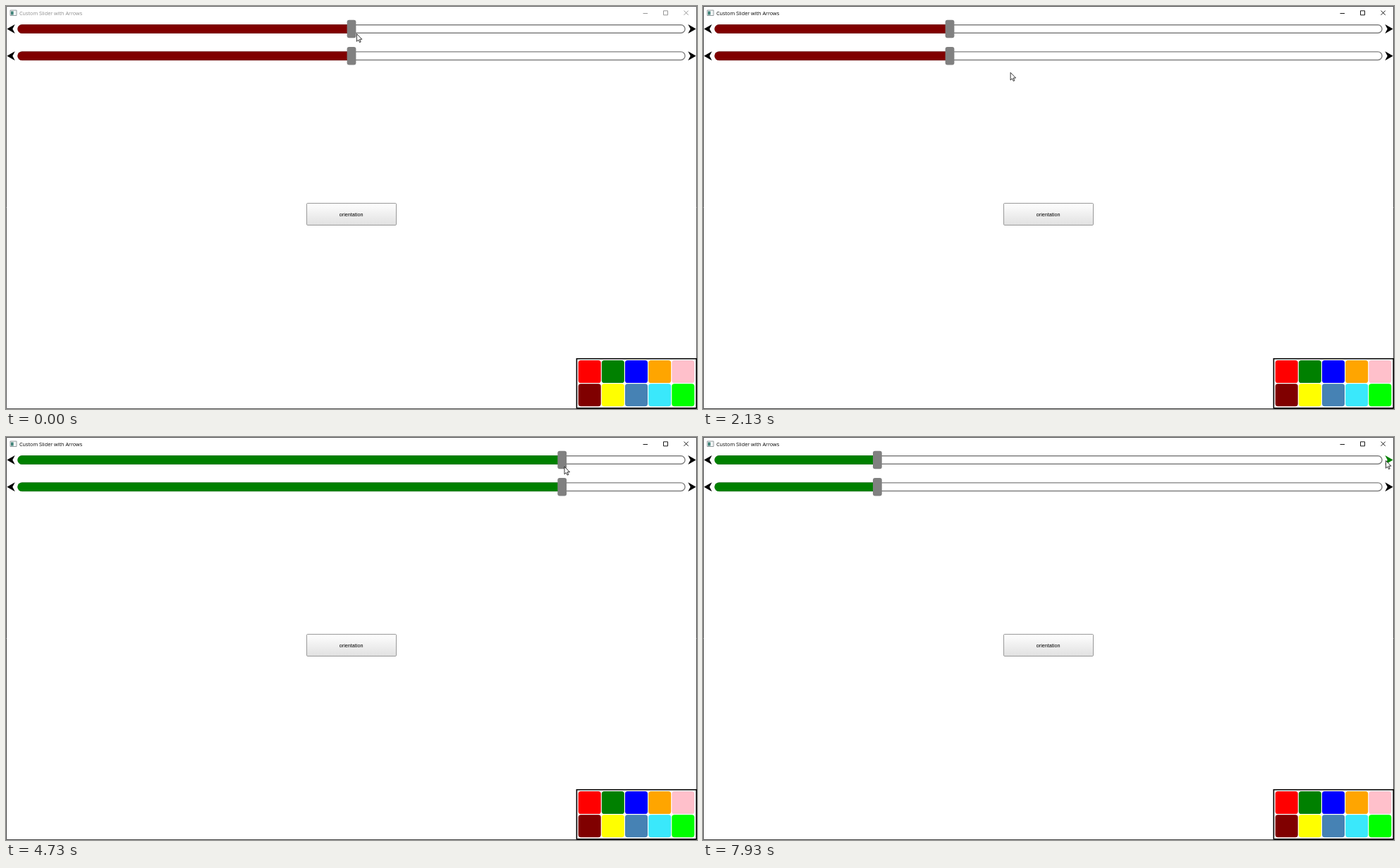
An HTML page with a canvas that plays this animation: 980x571 px, repeating every 8000 ms.

```html
<!DOCTYPE html>
<html lang="en">
<head>
<meta charset="utf-8">
<title>Slider</title>
<style>
html, body { margin: 0; width: 100%; height: 100%; overflow: hidden; background: #fff; }
canvas { display: block; width: 980px; height: 571px; }
</style>
</head>
<body>
<canvas id="stage" width="980" height="571"></canvas>
<script>
const ctx = document.getElementById('stage').getContext('2d');
const LOOP = 8000, TICK = 1000 / 15;
const PERCENT = 28 / 3;  // slider pixels per step

const smooth = k => k * k * (3 - 2 * k);
const linear = k => k;
const slowing = p => k => 1 - (1 - k) ** p;

// Pointer gestures in ticks; bend bows the path sideways.
const home = [497, 39];
const moves = [
  { from: 3, to: 13, end: [865, 9], ease: smooth },
  { from: 15, to: 18, end: [406, 60], ease: linear },
  { from: 18, to: 27, end: [160, 94], ease: slowing(2.3) },
  { from: 29, to: 37, end: [788, 62], ease: slowing(1.23), bend: [0, 15] },
  { from: 39, to: 52, end: [868, 484], ease: smooth, bend: [143, 0] },
  { from: 52, to: 58, end: [853, 519], ease: smooth },
  { from: 61, to: 65, end: [836, 101], ease: smooth, bend: [20, 0] },
  { from: 65, to: 72, end: [789, 38], ease: smooth },
  { from: 75, to: 78, end: [265, 130], ease: linear },
  { from: 78, to: 82, end: [160, 142], ease: slowing(1.5) },
  { from: 82, to: 84, end: [199, 138], ease: linear },
  { from: 88, to: 91, end: [982, 48], ease: slowing(0.73), bend: [0, -15] },
  { from: 95, to: 101, end: [968, 33], ease: slowing(2) }
];
const drags = [{ from: 3, to: 38 }, { from: 75, to: 85 }];
const recolorTick = 62, hoverTick = 98;
const arrowClicks = [106, 111, 114, 116, 119];
const swatches = ['red', 'green', 'blue', 'orange', 'pink', 'maroon', 'yellow', 'steelblue', '#3ae8fb', 'lime'];

function pointerAt(n) {
  let at = home;
  for (const { from, to, end, ease, bend = [0, 0] } of moves) {
    if (n <= from) break;
    const k = Math.min(1, (n - from) / (to - from));
    at = at.map((a, i) => a + (end[i] - a) * ease(k) + bend[i] * Math.sin(Math.PI * k));
  }
  return at;
}

// The slider follows the pointer one tick late, in whole percent.
function valueAt(n) {
  let v = 50;
  for (const { from, to } of drags) {
    if (n > from + 1) v = Math.round(50 + (pointerAt(Math.min(n - 1, to))[0] - 490) / PERCENT);
  }
  return v + arrowClicks.filter(c => n >= c).length;
}

function paint(fill, stroke, line = 1) {
  if (fill) { ctx.fillStyle = fill; ctx.fill(); }
  if (stroke) { ctx.strokeStyle = stroke; ctx.lineWidth = line; ctx.stroke(); }
}

function box(x, y, w, h, r, ...style) {
  ctx.beginPath();
  ctx.roundRect(x, y, w, h, r);
  paint(...style);
}

function poly(points, ...style) {
  ctx.beginPath();
  points.forEach(([x, y]) => ctx.lineTo(x, y));
  ctx.closePath();
  paint(...style);
}

function text(s, x, y, font, color, align) {
  ctx.font = font;
  ctx.fillStyle = color;
  ctx.textAlign = align;
  ctx.fillText(s, x, y);
}

function drawWindow(active) {
  ctx.fillStyle = '#fff';
  ctx.fillRect(0, 0, 980, 571);
  const ink = active ? '#000' : '#8c8c8c';
  box(0.5, 0.5, 979, 570, 0, null, active ? '#454545' : '#5c5c5c');

  box(6, 6, 9, 7.5, 0, '#f4f6f6', '#8a9296', 0.9);
  box(7, 7.5, 3.6, 5, 0, '#3f8278');

  text('Custom Slider with Arrows', 19, 12.8, '7.25px "Open Sans", sans-serif', ink, 'left');
  ctx.beginPath();
  ctx.moveTo(903.5, 10.5); ctx.lineTo(910, 10.5);
  ctx.rect(932.5, 6.8, 6, 6);
  ctx.moveTo(961.5, 6.6); ctx.lineTo(967.7, 12.8);
  ctx.moveTo(967.7, 6.6); ctx.lineTo(961.5, 12.8);
  paint(null, ink, 0.9);
}

function drawArrow(tip, cy, dir, color) {
  poly([[tip, cy], [tip + dir * 11.4, cy - 6.5], [tip + dir * 8, cy], [tip + dir * 11.4, cy + 6.5]], color);
}

function drawSlider(cy, x, color, hover) {
  box(17, cy - 5.8, 946, 11.6, 5.8, '#fff', '#808080', 1.4);
  box(16.4, cy - 6.3, x - 16.4, 12.6, [6.3, 0, 0, 6.3], color);
  box(x - 6.4, cy - 12.7, 12.8, 25.4, 3, '#808080');
  drawArrow(1.3, cy, 1, '#000');
  drawArrow(978.7, cy, -1, hover ? color : '#000');
}

function drawButton() {
  const g = ctx.createLinearGradient(0, 279, 0, 311);
  g.addColorStop(0, '#fff');
  g.addColorStop(1, '#e0e0e0');
  box(426.5, 279.5, 127, 31, 1.3, g, '#999');
  text('orientation', 489.6, 297.6, '7.2px "Liberation Sans", Arial, sans-serif', '#000', 'center');
}

function drawPalette() {
  box(809.4, 499.8, 169.8, 70, 0, '#fff', '#000', 1.6);
  swatches.forEach((c, i) =>
    box(811.7 + i % 5 * 33.15, 502 + Math.floor(i / 5) * 33.15, 32, 32, 3.6, c));
}

function drawPointer(x, y) {
  const shape = [[0, 0], [0, 16.5], [3.8, 13], [6.3, 18.5], [8.8, 17.5], [6.4, 11.8], [11.5, 11.8]];
  poly(shape.map(([a, b]) => [x + 0.4 + a * 0.65, y + 0.5 + b * 0.65]), '#fff', '#000', 0.8);
}

function render(t) {
  const n = Math.min(119, Math.floor((t + 4) / TICK));
  const x = 490 + (valueAt(n) - 50) * PERCENT;
  const color = n < recolorTick ? 'maroon' : 'green';
  drawWindow(n > 0);
  drawSlider(32.5, x, color, n >= hoverTick);
  drawSlider(70.7, x, color, false);
  drawButton();
  drawPalette();
  drawPointer(...pointerAt(n));
}

const start = performance.now();
function loop() {
  render((performance.now() - start) % LOOP);
  requestAnimationFrame(loop);
}
loop();
</script>
</body>
</html>
```
